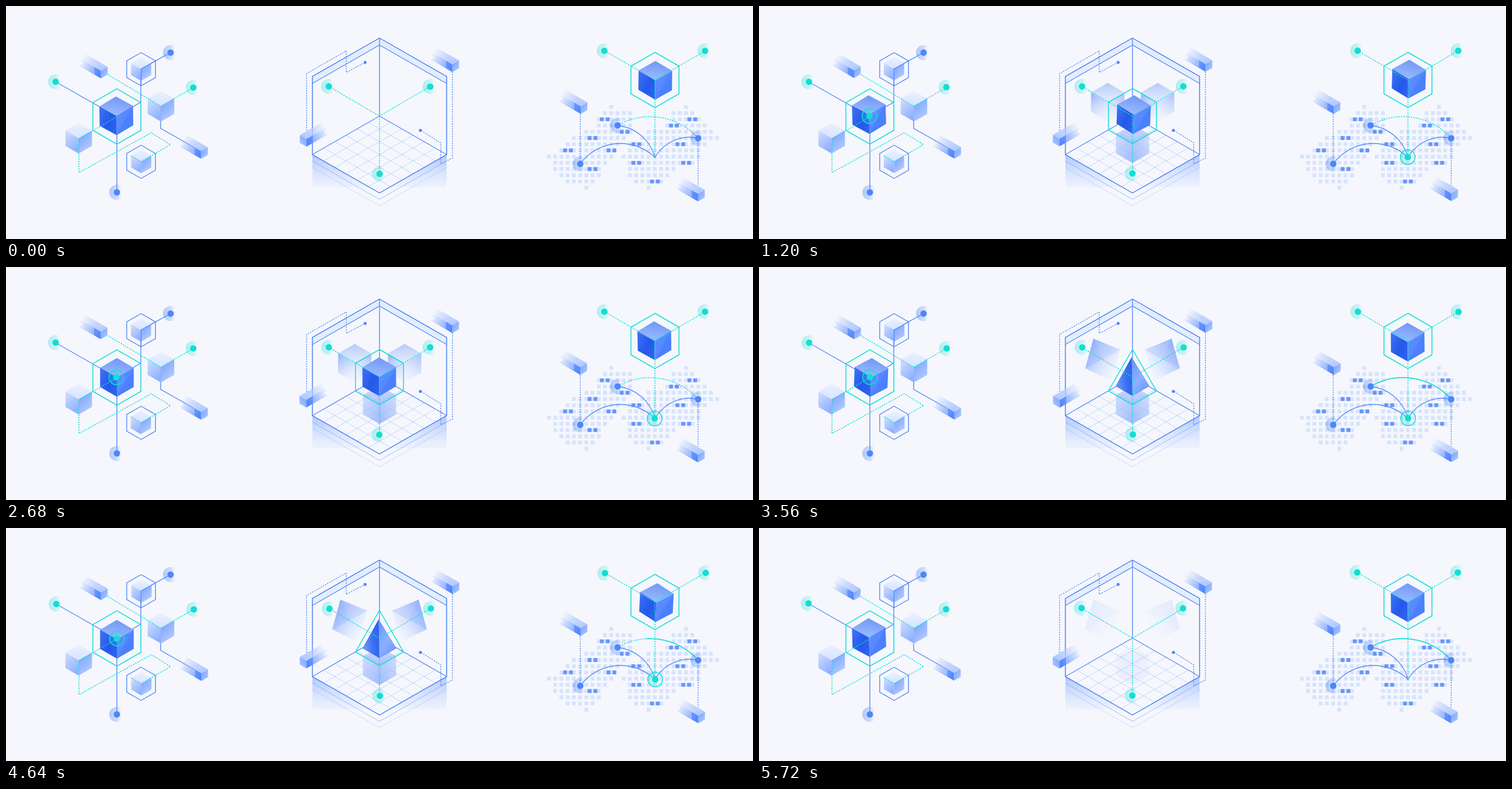
An HTML page that plays this animation: 1280 px wide and 400 px high, repeating every 5760 ms.

```html
<!DOCTYPE html>
<html lang="en">
<head>
<meta charset="utf-8">
<title>Isometric blocks</title>
<style>
html, body { margin: 0; width: 100%; height: 100%; overflow: hidden; background: #f5f7fc; }
svg { display: block; width: 100vw; height: 100vh; }
.line { fill: none; stroke: #5a8bf8; stroke-width: 1.4; }
.green { fill: none; stroke: #12ded3; stroke-width: 1.5; }
.dash { stroke-dasharray: 2.2 2; }
</style>
</head>
<body>
<svg id="stage" viewBox="0 0 1280 400"></svg>
<script>
const LOOP = 5760, STEP = 40;
const BLUE = '#4d86fa', GREEN = '#12ded3';
const stage = document.getElementById('stage');
const movers = [];

const pts = list => list.map(p => p.map(v => +v.toFixed(2)).join()).join(' ');
const poly = (list, fill, extra = '') => `<polygon points="${pts(list)}" fill="${fill}" ${extra}/>`;
const path = (d, cls, extra = '') => `<path d="${d}" class="${cls}" ${extra}/>`;
const disc = (x, y, r, fill) => `<circle cx="${x}" cy="${y}" r="${r}" fill="${fill}"/>`;

function shade(units, id, [x1, y1, x2, y2], stops) {
  const inner = stops.map(([at, color, alpha = 1]) =>
    `<stop offset="${at}" stop-color="${color}" stop-opacity="${alpha}"/>`).join('');
  return `<linearGradient id="${id}" gradientUnits="${units}" x1="${x1}" y1="${y1}" x2="${x2}" y2="${y2}">${inner}</linearGradient>`;
}
const grad = (id, x1, y1, x2, y2, ...stops) => shade('objectBoundingBox', id, [x1, y1, x2, y2], stops);
// Fades along the direction in which the small blocks travel.
const fade = (id, color, alpha) =>
  shade('userSpaceOnUse', id, [-35, -20, -8, -4.5], [[0, color, 0], [1, color, alpha]]);

// Corners of a pointed-top hexagon, clockwise from the top.
function corners(r) {
  const w = r * .866, h = r / 2;
  return [[0, -r], [w, -h], [w, h], [0, r], [-w, h], [-w, -h]];
}

const hex = (x, y, r, cls) =>
  `<polygon points="${pts(corners(r).map(p => [p[0] + x, p[1] + y]))}" class="${cls}"/>`;

function cube(r, kind) {
  const [a, b, c, d, e, f] = corners(r), o = [0, 0];
  return poly([a, b, o, f], `url(#${kind}T)`) + poly([f, o, d, e], `url(#${kind}L)`) +
    poly([o, b, c, d], `url(#${kind}R)`) +
    (kind === 'big' ? poly([b, c, d], '#457bfb', 'opacity=".5"') : '');
}

// A group that drifts around its home position.
function drift(x, y, body, amp = 1, id = '') {
  movers.push({ x, y, amp });
  return `<g class="drift" ${id && `id="${id}"`}>${body}</g>`;
}

const still = (x, y, body) => `<g transform="translate(${x} ${y})">${body}</g>`;
const node = kind => disc(0, 0, 13, `url(#halo${kind})`) + disc(0, 0, 5.5, kind === 'G' ? GREEN : BLUE);
const greenNode = (x, y) => drift(x, y, node('G'));
const blueNode = (x, y) => still(x, y, node('B'));

// A small block that leaves a fading streak behind it.
function runner(x, y, flip) {
  const [a, b, c, d, e, f] = corners(13.2), o = [0, 0];
  const back = ([px, py], n) => [px - .866 * n, py - .5 * n];
  const strips = (from, to, lengths, fill) => lengths.map((n, i) => {
    const p = mix(from, to, i / lengths.length), q = mix(from, to, (i + 1) / lengths.length);
    return poly([p, q, back(q, n), back(p, n)], fill);
  }).join('');
  const body = strips(f, a, [24, 29, 26, 31], 'url(#streakT)') +
    strips(f, e, [27, 23, 28], 'url(#streakL)') +
    poly([a, b, o, f], 'url(#runT)') + poly([f, o, d, e], 'url(#runL)') +
    poly([o, b, c, d], 'url(#runR)');
  return drift(x, y, flip ? `<g transform="scale(-1 1)">${body}</g>` : body, .4);
}

const pulse = (id, x, y) => drift(x, y,
  `<g id="${id}">${disc(0, 0, 13, 'url(#haloG)')}<circle r="12.6" class="green"/>${disc(0, 0, 5.5, GREEN)}</g>`);

const defs = '<defs>' +
  grad('bigT', .6, 0, .3, 1, [0, '#6f97f6'], [1, '#a0bcff']) +
  grad('bigL', 0, 0, 1, .8, [0, '#3f73f5'], [.6, '#2459ea'], [1, '#2d63f0']) +
  grad('bigR', 0, 0, 1, 1, [0, '#5f8fff'], [1, '#4c82ff']) +
  grad('pyrL', 0, .6, 1, .4, [0, '#6e99fa'], [.6, '#3b70f1'], [1, '#2c61ec']) +
  grad('pyrR', .2, 0, .8, 1, [0, '#6a96fd'], [.5, '#8fb0ff'], [1, '#6896fe']) +
  grad('midT', .5, 0, .5, 1, [0, '#eaf0ff'], [1, '#d7e4ff']) +
  grad('midL', 0, 0, .5, 1, [0, '#d3e0ff'], [1, '#8fb1ff']) +
  grad('midR', .2, 0, .8, 1, [0, '#7ba3ff'], [1, '#b9cfff']) +
  grad('ghostT', 0, 0, 0, 1, [0, '#8aabf8', .6], [1, '#c3d5fd', .35]) +
  grad('ghostL', .2, 0, .6, 1, [0, '#7ca2fb', .75], [1, '#dbe6ff', .25]) +
  grad('ghostR', .8, 0, .4, 1, [0, '#83a8fb', .65], [1, '#dbe6ff', .2]) +
  grad('tilt', .1, .2, .9, .8, [0, '#82a6fb', .85], [1, '#cfdefe', .05]) +
  grad('baseT', 0, 0, 0, 1, [0, '#a9c2fc', .5], [1, '#86a9fa', .7]) +
  grad('baseL', 0, 0, 1, 1, [0, '#c0d3fe', .7], [1, '#84a8fb', .75]) +
  grad('baseR', 1, 0, 0, 1, [0, '#c0d3fe', .7], [1, '#84a8fb', .75]) +
  grad('runT', 0, 0, 1, 1, [0, '#c5d7ff'], [1, '#a9c4ff']) +
  grad('runL', 0, 0, 1, 1, [0, '#6d9aff'], [1, '#4a81fb']) +
  grad('runR', 0, 0, 1, 1, [0, '#77a1ff'], [1, '#b3caff']) +
  fade('streakT', '#b5cbff', .95) + fade('streakL', '#86abff', .9) +
  grad('haloG', 0, 0, 1, 0, [0, GREEN, .32], [.5, GREEN, .2], [.8, GREEN, 0]) +
  grad('haloB', 0, 0, 1, 0, [0, BLUE, .42], [.5, BLUE, .24], [.8, BLUE, 0]) +
  grad('mirror', 0, 0, 0, 1, [0, '#a3bffb', .85], [1, '#dbe6ff', .15]) + '</defs>';

function network() {
  return path('M85 130L190 190V320M282 80L231 108V165L190 189M265 172V210L323 243', 'line') +
    blueNode(282, 80) + blueNode(190, 320) +
    hex(231.5, 108.5, 28.5, 'line') + drift(231.5, 108, cube(20, 'mid'), .8) +
    path('M231.5 137V108L256 94.5', 'line') +
    hex(231.5, 267.5, 28.5, 'line') + drift(231.5, 267, cube(20, 'mid'), .8) +
    still(124.5, 227, cube(26.3, 'mid')) + still(265.5, 172, cube(26.3, 'mid')) +
    drift(190, 189.5, cube(33.2, 'big'), 1, 'cubeA') +
    hex(190, 189.7, 47.5, 'green') +
    path('M175 118L265 172L321 140M190 190L125 228V286L249 217.5L282 238L231.5 267L214 257', 'green dash') +
    runner(162.7, 110.7) + runner(334.5, 249) +
    greenNode(85.3, 130) + greenNode(321, 139.5) + pulse('pulseA', 189.3, 189.3);
}

function room() {
  const cells = 6;
  let grid = '';
  for (let i = 1; i < cells; i++) {
    const x = 115 * i / cells, y = 66 * i / cells;
    grid += `M${640 + x} ${189 + y}l-115 66M${640 - x} ${189 + y}l115 66`;
  }
  const [a, b, c, d, e, f] = corners(33), o = [0, 0];
  const ghost = (x, y) => still(x, y, cube(33, 'ghost'));
  const tilt = side => {
    const q = [[-67, -66], [-21, -47], [-38, 6], [-81, -15]], m = [-50, -31];
    return `<g transform="translate(640 189) scale(${side} 1)">${poly(q, 'url(#tilt)') +
      poly([q[0], m, q[3]], '#7fa4fb', 'opacity=".25"') +
      poly([q[0], q[1], m], '#9bb8fc', 'opacity=".3"')}</g>`;
  };
  const base = still(640, 236.5, poly([a, b, o, f], 'url(#baseT)') +
    poly([f, o, d, e], 'url(#baseL)') + poly([o, b, c, d], 'url(#baseR)') +
    path('M-28.6 -16.5L0 0L28.6 -16.5', 'line', 'opacity=".25"'));
  const faces = (fills, ids) => fills.map((fill, i) => `<polygon class="${ids[i]}" fill="${fill}"/>`).join('');
  return poly([[525, 255], [640, 321], [755, 255], [755, 311], [525, 311]], 'url(#mirror)') +
    path('M525 266L640 332L755 266', 'line', 'opacity=".38"') +
    path('M525 277L640 343L755 277', 'line', 'opacity=".2"') +
    poly([[640, 189], [755, 255], [640, 321], [525, 255]], '#f5f7fc') +
    path(grid, 'line', 'style="stroke-width:.8;opacity:.4"') +
    poly([[525, 121], [640, 55], [755, 121], [755, 133], [640, 67], [525, 133]], '#e3edfc') +
    path('M525 133L640 67L755 133M640 55V189M525 255L640 189L755 255', 'line') +
    path('M640 55L755 121V255L640 321L525 255V121Z', 'line', 'style="stroke:#4379f5"') +
    path('M515 214V116L583 77V114L615 97M765 113V261L745 271V235L710 213', 'line dash') +
    disc(615.3, 96.8, 2.6, BLUE) + disc(710, 213.5, 2.6, BLUE) +
    `<g id="ghosts">${ghost(597.5, 165)}${ghost(683, 165)}</g>` +
    `<g id="tilts">${tilt(1)}${tilt(-1)}</g><g id="base">${base}</g>` +
    drift(640, 188.5,
      faces(['url(#bigT)', 'url(#bigL)', 'url(#bigR)'], ['top', 'left', 'right']) +
      '<polygon class="shade" fill="#457bfb" opacity=".5"/>' +
      `<g id="pyramid">${faces(['url(#pyrL)', 'url(#pyrR)'], ['left', 'right'])}</g>`, 1, 'cubeB') +
    '<polygon id="frame" class="green"/>' +
    path('M553 138L640 189L727 138M640 189V288', 'green dash') +
    runner(514.7, 228, true) + runner(765, 100) +
    greenNode(553.3, 138) + greenNode(727, 138) + greenNode(640, 287.8);
}

// Filled column ranges of each row: first mass, then second.
const LAND = [
  [10, 10, 22, 22], [9, 13, 20, 23], [8, 13, 20, 24], [8, 13, 19, 25], [6, 13, 16, 26],
  [4, 12, 15, 27], [3, 11, 13, 25], [2, 10, 13, 24], [0, 10, 12, 24], [1, 9, 13, 23],
  [1, 8, 13, 20], [2, 8, 13, 19], [3, 7, 14, 18], [6, 6, 16, 16]
];
const CITIES = [
  [1021, 2], [1055, 4], [1000, 5], [958, 7], [1032.5, 7], [1000, 10], [1075, 6],
  [1075, 9], [1107, 12], [1139.5, 3], [1171, 2], [1150.5, 6], [1160.5, 9]
];
const PITCH = 10.67;
const ARC = 'M1048 205A110 110 0 0 1 1186 227';

function world() {
  const tile = (x, row, fill) =>
    `<rect x="${(x - 3.3).toFixed(1)}" y="${(169.9 + row * PITCH).toFixed(1)}" width="6.6" height="6.6" rx="1" fill="${fill}"/>`;
  let map = '';
  LAND.forEach(([a, b, c, d], row) => {
    for (let k = a; k <= d; k++) if (k <= b || k >= c) map += tile(930.4 + k * PITCH, row, '#d7e3fe');
  });
  CITIES.forEach(([x, row]) => { map += tile(x, row, '#6796fa') + tile(x + 10, row, '#6796fa'); });
  return map + path('M984 185V271M1186 227V308', 'line dash') +
    path('M984 271A85 85 0 0 1 1112 260A74 74 0 0 0 1048 205M1186 227A68 68 0 0 0 1112 260', 'line') +
    path(ARC, 'green dash') + path(ARC, 'green', 'id="arc" pathLength="100"') +
    blueNode(1048, 205) + blueNode(984, 271) + blueNode(1186, 227) +
    drift(1112, 127, cube(33.2, 'big'), 1, 'cubeC') + hex(1112, 127, 47.5, 'green') +
    path('M1026 77L1112 127L1198 77M1112 127V260', 'green dash') +
    runner(984.7, 172) + runner(1186, 322) +
    greenNode(1025.5, 76.8) + greenNode(1198, 76.8) + pulse('pulseC', 1111.7, 259.8);
}

const TIMES = [0, 1200, 1800, 2680, 3560, 4640, 5720];
const SWAY = { x: [0, .1, -.6, -.4, .8, .7, -.3], y: [.3, -.1, -.3, 0, 0, .4, -.3] };
const POSE = {
  cubeA: { x: [-1, -1.5, -.5, 0, 2, 0, -1.5], y: [-1, -3, -2, 0, 0, 1.5, -1.5] },
  cubeB: { x: [0, 2, 1, -.5, 0, 0, 0], y: [0, -2, -.5, 0, -.5, 1.5, 0] },
  cubeC: { x: [.5, 1.5, 1.5, -1, -.5, 2.5, -.5], y: [.5, -1.5, 0, -.5, 2, 1, 1] }
};

const clamp = v => Math.min(1, Math.max(0, v));
const ease = (t, from, to) => {
  const k = clamp((t - from) / (to - from));
  return k * k * (3 - 2 * k);
};
const mix = (p, q, k) => p.map((v, i) => v + (q[i] - v) * k);

stage.innerHTML = defs + network() + room() + world();
const groups = [...stage.querySelectorAll('.drift')];
const $ = id => document.getElementById(id);

function track(values, t) {
  let i = 0;
  while (i < TIMES.length - 2 && t >= TIMES[i + 1]) i++;
  return values[i] + (values[i + 1] - values[i]) * ease(t, TIMES[i], TIMES[i + 1]);
}

// Draws the upper corners of the cube and its frame together into one tip.
function morph(k) {
  const [a, b, c, d, e, f] = corners(33.2), apex = [-1.5, -33];
  const to = p => mix(p, apex, k);
  const A = to(a), B = to(b), F = to(f), O = to([0, 0]);
  const set = (name, list) => $('cubeB').querySelectorAll('.' + name)
    .forEach(el => el.setAttribute('points', pts(list)));
  set('top', [A, B, O, F]);
  set('left', [F, O, d, e]);
  set('right', [O, B, c, d]);
  set('shade', [B, c, d]);
  const h = corners(47.5);
  h[1] = mix(h[1], h[0], k);
  h[5] = mix(h[5], h[0], k);
  $('frame').setAttribute('points', pts(h.map(p => [p[0] + 640, p[1] + 189])));
}

function draw(now) {
  const t = Math.floor((now % LOOP) / STEP) * STEP;
  const turn = 2 * Math.PI * t / LOOP;

  groups.forEach((g, i) => {
    const m = movers[i], pose = POSE[g.id] || SWAY;
    let dx = track(pose.x, t) * m.amp, dy = track(pose.y, t) * m.amp;
    if (pose === SWAY) {
      dx += .25 * Math.sin(3 * turn + i);
      dy += .25 * Math.cos(2 * turn + i * 2);
    }
    const spin = pose === SWAY ? 0 : dx * 1.1;
    g.setAttribute('transform', `translate(${m.x + dx} ${m.y + dy}) rotate(${spin})`);
  });

  const grow = ease(t, 200, 700) * (1 - .75 * ease(t, 5350, 5720));
  ['pulseA', 'pulseC'].forEach(id => {
    const [halo, ring] = $(id).children;
    $(id).setAttribute('transform', `scale(${grow})`);
    [halo, ring].forEach(el => el.setAttribute('opacity', 1 - ease(t, 5300, 5600)));
  });

  const change = ease(t, 2960, 3400);
  const show = ease(t, 160, 720);
  const main = show * (1 - ease(t, 5160, 5560));
  const rest = show * (1 - .82 * ease(t, 5240, 5740));
  morph(change);
  $('pyramid').setAttribute('opacity', change);
  $('cubeB').setAttribute('opacity', main);
  $('frame').setAttribute('opacity', main);
  $('ghosts').setAttribute('opacity', rest * (1 - change));
  $('tilts').setAttribute('opacity', rest * change);
  $('base').setAttribute('opacity', rest);

  // The solid stroke runs along the arc, empties from its tail, then runs again.
  const again = t >= 5080;
  const head = 100 * (again ? ease(t, 5080, 5760) : ease(t, 2760, 3600));
  const tail = again ? 0 : 100 * ease(t, 4360, 5080);
  $('arc').setAttribute('stroke-dasharray', `0 ${tail} ${Math.max(0, head - tail)} 200`);
  $('arc').setAttribute('visibility', head - tail > .1 ? 'visible' : 'hidden');
}

function tick() {
  draw(performance.now());
  requestAnimationFrame(tick);
}
tick();
</script>
</body>
</html>
```
